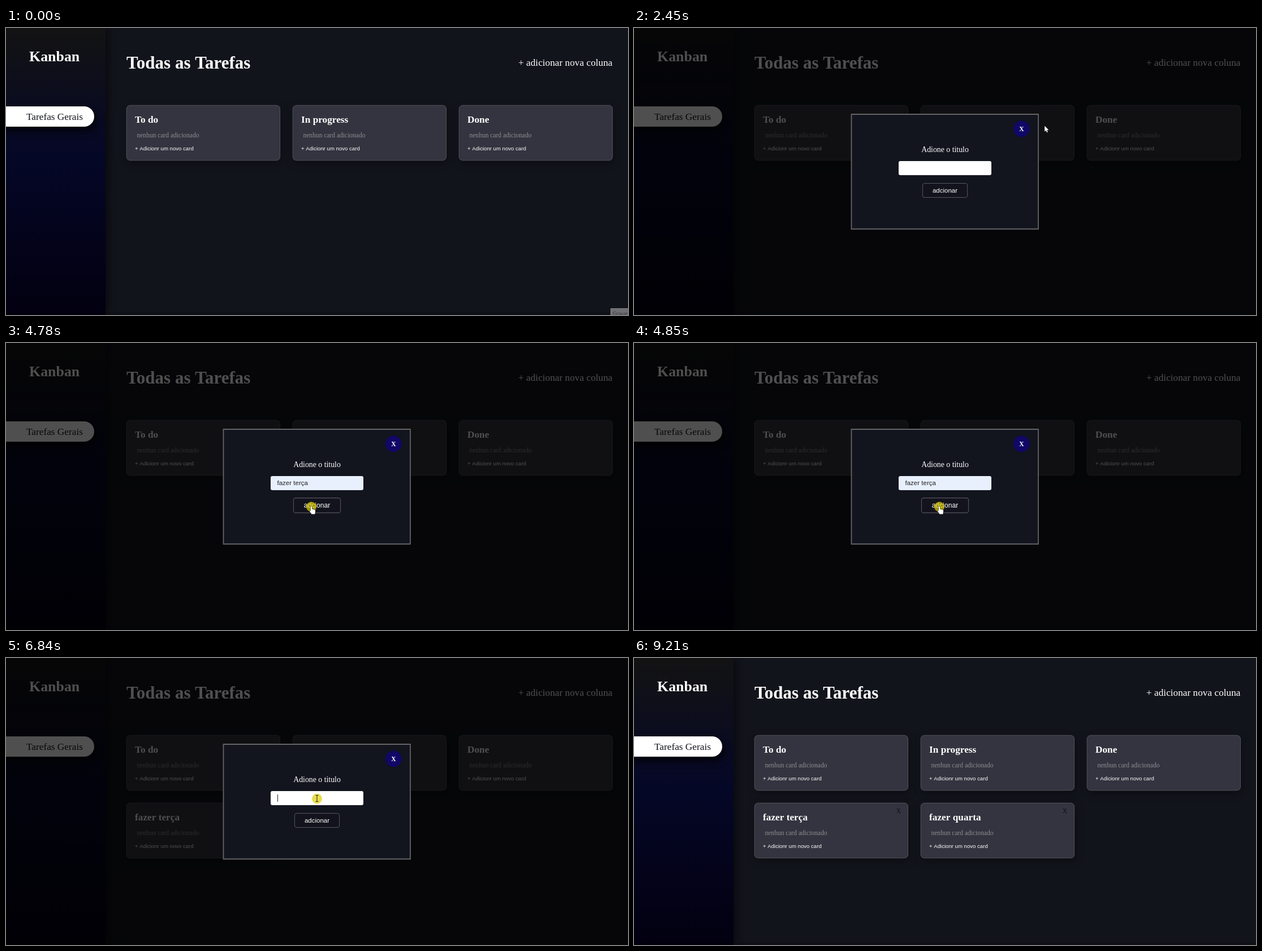
An HTML page with a canvas for the animation above (9.6 s loop, 1100 by 509 pixels).

```html
<!DOCTYPE html>
<html lang="pt">
<head>
<meta charset="utf-8">
<title>Kanban</title>
<style>
html, body { margin: 0; width: 100%; height: 100%; overflow: hidden; background: #12141c; }
canvas { display: block; width: 1100px; height: 509px; }
</style>
</head>
<body>
<canvas id="stage" width="1100" height="509"></canvas>
<script>
const ctx = document.getElementById('stage').getContext('2d');
const LOOP = 9600;
const SERIF = '"Liberation Serif", "Times New Roman", serif';
const SANS = '"Liberation Sans", Arial, sans-serif';
const UI = '"Open Sans", "Noto Sans", sans-serif';
const COLS = [213, 507, 801];
const OPTIONS = ['fazer quarta', 'fazer terça', 'quarta', 'quelvino', 'fazer amanhã', 'fazer domingo'];

// Cursor path: time, x, y
const PATH = [
  [70, 1086, 488], [680, 941, 76], [880, 941, 76], [1300, 989, 61], [2100, 989, 61],
  [2720, 550, 249], [3240, 550, 249], [3370, 549, 280], [3440, 549, 280], [3770, 557, 301],
  [4250, 557, 301], [4720, 540, 290], [4920, 540, 290], [5740, 938, 61], [6150, 938, 61],
  [6700, 550, 249], [7110, 550, 249], [7380, 555, 283], [7780, 555, 283], [8200, 565, 293],
  [8670, 565, 293], [9210, 1070, 497]
];
const CLICKS = [[1960, 2090], [2910, 2990], [3970, 4100], [4780, 4900], [5940, 6080], [6840, 6910], [7710, 7850], [8340, 8470]];

// One entry per visit to the dialog
const DIALOGS = [
  { open: 2090, list: 2990, hover: 3240, pick: 4100, unlist: 4250, close: 4900, value: 'fazer terça' },
  { open: 6150, list: 6910, hover: 7110, pick: 7780, unlist: 7850, close: 8470, value: 'fazer quarta' }
];

const ARROW = new Path2D('M0 0v10.2l2.4-2.1 1.6 3.6 1.7-.8-1.6-3.4h3.2z');
const HAND = new Path2D('M-1.3 .4q1.3-1.6 2.6 0v4.4l4.6 1q1.5.5 1.3 2l-.8 5.6H.4l-3.3-4.6q-.7-1.7.9-1.5l.7.8z');

const during = (t, a, b) => t >= a && t < b;

function text(str, x, y, font, color, align = 'left') {
  ctx.font = font;
  ctx.fillStyle = color;
  ctx.textAlign = align;
  ctx.fillText(str, x, y);
}

function box(x, y, w, h, r, fill, stroke, line = 1) {
  ctx.beginPath();
  ctx.roundRect(x, y, w, h, r);
  if (fill) { ctx.fillStyle = fill; ctx.fill(); }
  if (stroke) { ctx.strokeStyle = stroke; ctx.lineWidth = line; ctx.stroke(); }
}

function disc(x, y, r, fill) {
  ctx.beginPath();
  ctx.arc(x, y, r, 0, 7);
  ctx.fillStyle = fill;
  ctx.fill();
}

function shadow(color, blur, dx, dy, draw) {
  ctx.save();
  ctx.shadowColor = color;
  ctx.shadowBlur = blur;
  ctx.shadowOffsetX = dx;
  ctx.shadowOffsetY = dy;
  draw();
  ctx.restore();
}

function cursorAt(t) {
  let i = 0;
  while (i < PATH.length - 2 && t >= PATH[i + 1][0]) i++;
  const [t0, x0, y0] = PATH[i], [t1, x1, y1] = PATH[i + 1];
  const u = Math.max(0, Math.min(1, (t - t0) / (t1 - t0)));
  const k = u * u * (3 - 2 * u);
  return { x: x0 + (x1 - x0) * k, y: y0 + (y1 - y0) * k };
}

function drawSidebar() {
  const g = ctx.createLinearGradient(0, 0, 0, 509);
  g.addColorStop(0, '#131313');
  g.addColorStop(0.45, '#050727');
  g.addColorStop(1, '#020010');
  shadow('rgba(0,0,0,.65)', 16, 4, 0, () => {
    ctx.fillStyle = g;
    ctx.fillRect(0, 0, 176, 509);
  });
  text('Kanban', 41, 59, `bold 25.9px ${SERIF}`, '#fff');
  shadow('rgba(0,0,0,.8)', 14, 3, 7, () => box(-20, 139, 176, 36, 18, '#fff'));
  text('Tarefas Gerais', 36, 163, `17.28px ${SERIF}`, '#12141c');
}

function drawColumn(title, x, y, closeColor) {
  shadow('rgba(0,0,0,.35)', 14, 2, 5, () => box(x, y, 272, 98, 6.5, '#33343f'));
  box(x + 0.2, y + 0.2, 271.4, 97.6, 6.5, null, '#525257');
  text(title, x + 15, y + 31, `bold 17.28px ${SERIF}`, '#fff');
  text('nenhun card adicionado', x + 18.5, y + 57, `11.52px ${SERIF}`, '#8d8d92');
  text('+ Adicionr um novo card', x + 15, y + 79.5, `9.6px ${SANS}`, '#fff');
  if (closeColor) text('X', x + 255, y + 17.5, `11.52px ${SERIF}`, closeColor, 'center');
}

function drawBoard(t, linkHover) {
  ctx.fillStyle = '#12141c';
  ctx.fillRect(0, 0, 1100, 509);
  drawSidebar();
  text('Todas as Tarefas', 213, 72, `bold 31px ${SERIF}`, '#fff');
  text('+ adicionar nova coluna', 1072.5, 67, `17.28px ${SERIF}`, linkHover ? '#7059f6' : '#fff', 'right');
  ['To do', 'In progress', 'Done'].forEach((title, i) => drawColumn(title, COLS[i], 137));
  const closeColor = t < DIALOGS[1].open ? '#64202a' : '#120c12';
  DIALOGS.forEach((d, i) => {
    if (t >= d.close) drawColumn(d.value, COLS[i], 257, closeColor);
  });
  ctx.fillStyle = 'rgba(0,0,0,.2)';
  ctx.fillRect(0, 504, 1100, 5);
}

function drawList(active) {
  ctx.beginPath();
  ctx.moveTo(544, 268);
  ctx.lineTo(550, 262);
  ctx.lineTo(556, 268);
  ctx.fillStyle = '#3b3c3e';
  ctx.fill();
  box(534.5, 267.5, 86.5, 162, 2.5, '#28292b', '#39393b');
  if (active >= 0) box(535, 271 + active * 26, 86, 25.5, 0, '#3f4042');
  OPTIONS.forEach((o, i) => text(o, 543, 287.3 + i * 26, `8.75px ${UI}`, '#f1f1f1'));
}

function drawDialog(t, d, pos, buttonHover) {
  const alpha = Math.min(1, (t - d.open) / 140);
  ctx.globalAlpha = alpha;
  ctx.fillStyle = 'rgba(0,0,0,.69)';
  ctx.fillRect(0, 0, 1100, 509);
  box(384.5, 153, 330.5, 203.5, 0, '#12141e', '#646468', 1.8);
  disc(685.3, 178.8, 14.3, '#100767');
  text('X', 685.3, 182.8, `bold 11.52px ${SERIF}`, '#fff', 'center');
  text('Adione o titulo', 550, 220, `13.82px ${SERIF}`, '#fff', 'center');

  const filled = t >= d.hover;
  box(468, 236, 164, 25, 3, filled ? '#e8f0fe' : '#fff');
  if (t >= d.pick) text(d.value, 479.5, 251.8, `11.52px ${SANS}`, '#222');
  const active = t < d.hover || pos.y < 268 ? -1 : pos.y < 297 ? 0 : 1;
  if (filled && t < d.pick && active >= 0) {
    text(OPTIONS[active], 479.5, 251.8, `9.6px ${SANS}`, '#222');
  }
  if (during(t, d.list - 70, d.pick)) {
    ctx.fillStyle = '#222';
    ctx.fillRect(480, 242, 1, 13);
  }

  ctx.save();
  ctx.translate(550, 288);
  if (buttonHover) ctx.scale(1.05, 1.05);
  box(-39.6, -12.5, 79.2, 25, 3.5, '#12131c', '#57575c');
  text('adcionar', 0, 3.7, `11.52px ${SANS}`, '#fff', 'center');
  ctx.restore();

  if (during(t, d.list, d.unlist)) drawList(active);
  ctx.globalAlpha = 1;
}

function drawCursor(t, pos, kind) {
  if (CLICKS.some(([a, b]) => during(t, a, b))) disc(pos.x, pos.y + 0.5, 9, 'rgba(222,206,0,.7)');
  ctx.save();
  ctx.translate(pos.x, pos.y);
  if (kind === 'beam') {
    ctx.fillStyle = '#222';
    ctx.fillRect(-0.5, -6, 1, 12);
    ctx.fillRect(-2.5, -6, 5, 1);
    ctx.fillRect(-2.5, 5, 5, 1);
  } else {
    const shape = kind === 'hand' ? HAND : ARROW;
    ctx.lineWidth = 1.2;
    ctx.strokeStyle = 'rgba(0,0,0,.75)';
    ctx.stroke(shape);
    ctx.fillStyle = '#fff';
    ctx.fill(shape);
  }
  ctx.restore();
}

function render(t) {
  const pos = cursorAt(t);
  const inside = (x0, y0, x1, y1) => pos.x >= x0 && pos.x <= x1 && pos.y >= y0 && pos.y <= y1;
  const dialog = DIALOGS.find(d => during(t, d.open, d.close));
  const listed = dialog && during(t, dialog.list, dialog.unlist);
  const linkHover = !dialog && t >= 70 && inside(905, 51, 1073, 72);
  const buttonHover = !!dialog && !listed && inside(510, 275, 590, 301);
  const inputHover = !!dialog && inside(468, 236, 632, 261);

  drawBoard(t, linkHover);
  if (dialog) drawDialog(t, dialog, pos, buttonHover);
  if (t < 70) {
    box(1069.5, 497.5, 40, 20, 0, '#6f6f73', '#818185');
    text('Gravar', 1073, 509.5, `8.6px ${UI}`, '#2f2f33');
  } else if (t < 9210) {
    drawCursor(t, pos, linkHover || buttonHover ? 'hand' : inputHover ? 'beam' : 'arrow');
  }
}

const start = performance.now();
function tick() {
  render((performance.now() - start) % LOOP);
  requestAnimationFrame(tick);
}
tick();
</script>
</body>
</html>
```
